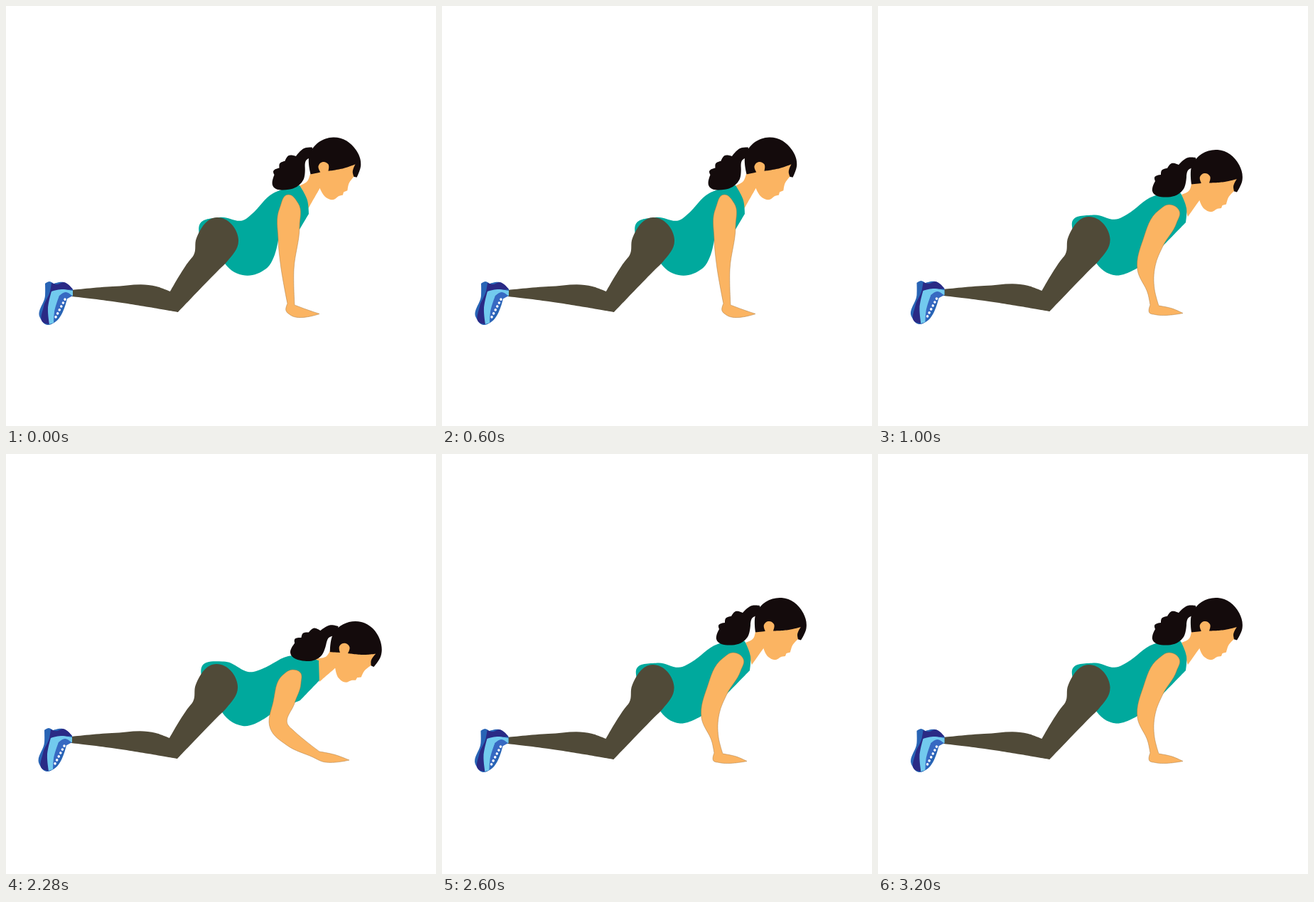
Recreate the animation shown at these times as an HTML page. Size 605 px wide and 590 px high, loop 3600 ms.

```html
<!DOCTYPE html>
<html lang="en">
<head>
<meta charset="utf-8">
<title>Knee push-up</title>
<style>
  html, body { margin: 0; width: 100%; height: 100%; overflow: hidden; background: #fff; }
  svg { display: block; width: 100%; height: 100%; }
  .skin { fill: #fbb462; }
  .hair { fill: #140b0c; }
  .shirt { fill: #00a99d; }
  .leggings { fill: #504a38; }
  #arm { stroke: #a9783f; stroke-width: .5; stroke-linejoin: round; }
</style>
</head>
<body>
<svg viewBox="0 0 605 590">
  <path id="neck" class="skin"/>
  <path id="torso" class="shirt"/>

  <g id="head">
    <path class="hair" data-outline="447,213! 436,213 423,223! 413,221 407,228! 399,231 398,237! 389,241 390,246! 386,260 408,268.5 430,257 434,240! 436,231 447,226!"/>
    <path class="hair" data-outline="441,250.5! 442,223 478,202 508,223 512.5,245 505,261.5! 500,260! 498,249! 452,253!"/>
    <path class="skin" data-outline="441,250.5! 455,249! 453,240 459,235 467,239 466,248.5! 488,247 505,243! 500,254 501,260! 493,269 490,278.5! 484.5,280! 483,284! 477,285 470,289 459,285 452,272!"/>
  </g>

  <g id="lower">
    <path class="leggings" data-outline="93,399! 150,394 212,394 231,401! 257,359 264,350 268,326 297,297 327,328 311,359 300,370 242,430! 150,415 93,408!"/>
    <path fill="#2864b5" data-outline="55,390! 61,387 67,390! 81,388 94,398! 94,407! 86,411! 69,444 58,448 48,438 55,407"/>
    <path fill="#2a2a85" data-outline="64,389! 72,391 81,388 94,398! 64,401! 61,447! 53,445 53,422 62,401"/>
    <path fill="#72caee" data-outline="64,401! 78,398 94,400! 94,407! 75,407! 67,445! 61,447! 59,425"/>
    <path fill="#3769c2" data-outline="75,407! 84,402 93,407! 86,411! 67,445! 68,430"/>
    <path d="M83 412L70 437" fill="none" stroke="#fff" stroke-width="3.5" stroke-linecap="round" stroke-dasharray=".1 5.5"/>
  </g>

  <path id="arm" class="skin"/>
</svg>
<script>
const part = id => document.getElementById(id);

// Closed curve through "x,y" points; "!" marks a sharp corner.
function curve(outline) {
  const points = outline.split(' ').map(text => {
    const [x, y] = text.replace('!', '').split(',').map(Number);
    return { x, y, sharp: text.endsWith('!') };
  });
  const count = points.length;
  const at = i => points[(i + count) % count];
  const handle = (i, reach) => {
    const p = at(i);
    if (p.sharp) return `${p.x} ${p.y}`;
    const weight = (a, b) => 1 / ((b.x - a.x) ** 2 + (b.y - a.y) ** 2);
    const before = at(i - 1), after = at(i + 1);
    const w = weight(before, p), v = weight(p, after);
    const dx = (p.x - before.x) * w + (after.x - p.x) * v;
    const dy = (p.y - before.y) * w + (after.y - p.y) * v;
    const scale = reach / Math.hypot(dx, dy);
    return `${p.x + dx * scale} ${p.y + dy * scale}`;
  };
  const segments = points.map((p, i) => {
    const next = at(i + 1);
    const reach = Math.hypot(next.x - p.x, next.y - p.y) * .36;
    return `C${handle(i, reach)} ${handle(i + 1, -reach)} ${next.x} ${next.y}`;
  });
  return `M${points[0].x} ${points[0].y}${segments.join('')}Z`;
}

const high = {
  head: 'translate(-14 -16) rotate(-6 461 235)',
  lower: 'translate(0 0)',
  neck: curve('428,236! 424,246 411,253! 425,285! 441,257! 448,240!'),
  torso: curve('272,322! 272,308 300,297 336,300 345,293 376,263 413,252! 424,273 426,292! 413,314! 384,322! 366,369 333,378 306,359 300,325!'),
  arm: curve('397,265 385,284 383,328 386,361 396,418! 394,428 400,434 441,432.5! 422,426 406,420! 405,370 413,310 411,277')
};

const middle = {
  head: 'translate(0 0)',
  lower: 'translate(-.5 -1)',
  neck: curve('441,249! 438,259 427,265! 436,296! 453,272! 463,250!'),
  torso: curve('274,315! 273,304 303,293.5 338,299 350,293 388,267 426,263! 434,284 433,304! 400,338! 365,368! 335,378.5 305,358 300,325!'),
  arm: curve('410,279 395,287 373,328 365,370 380,405 383,420! 382,431 390,433.5 429,431.5! 414,425 395,421! 389,398 390,365 401,337 420,305 424,288')
};

const low = {
  head: 'translate(17 31) rotate(9 461 235)',
  lower: 'translate(-1 -2)',
  neck: curve('456,276! 451,284 436,287! 441,320! 464,300! 478,282!'),
  torso: curve('275,313! 275,300 306,291.5 348,306 360,302 403,283 440,290! 441,318! 414,346! 378,361! 333,382 302,359 300,325!'),
  arm: curve('403,303 390,310 376,348 372,386 395,409 432,426 445,432 483,430! 463,422.5 441,418! 404,388 397,381 406,350 415,322 414,307')
};

function show(pose) {
  for (const id of ['head', 'lower']) part(id).setAttribute('transform', pose[id]);
  for (const id of ['neck', 'torso', 'arm']) part(id).setAttribute('d', pose[id]);
}

function poseAt(time) {
  if (time < 1000) return high;
  return time >= 1800 && time < 2600 ? low : middle;
}

function tick() {
  show(poseAt(performance.now() % 3600));
  requestAnimationFrame(tick);
}

for (const path of document.querySelectorAll('[data-outline]')) {
  path.setAttribute('d', curve(path.dataset.outline));
}
tick();
</script>
</body>
</html>
```
